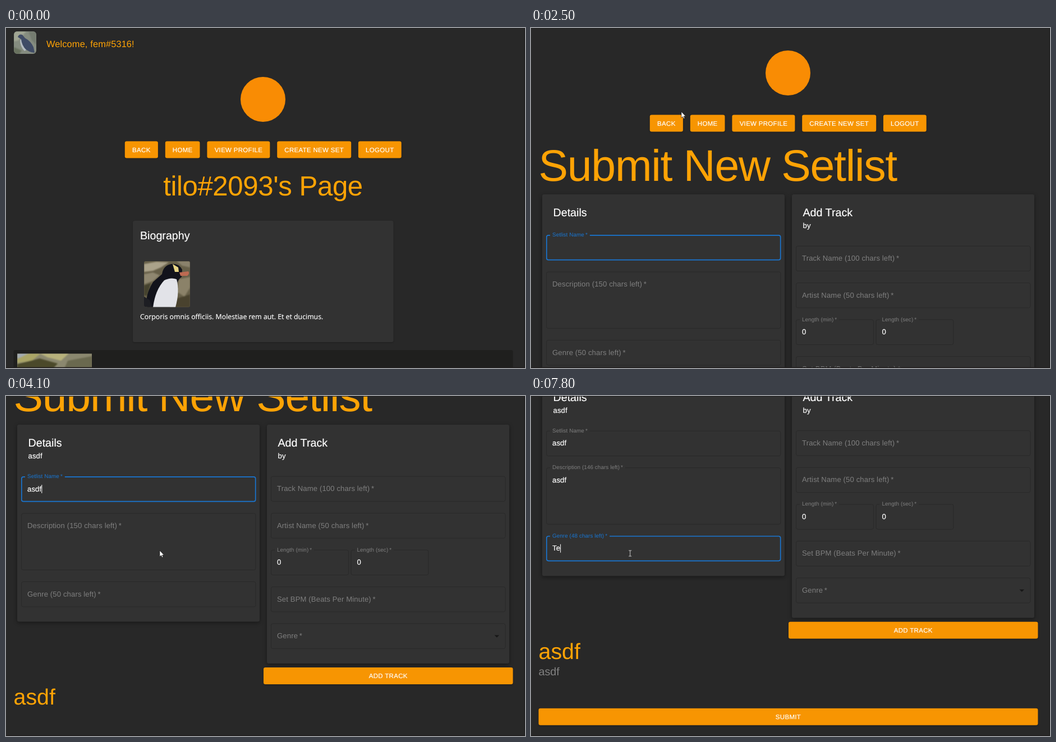
Write an HTML page that moves like this. It is 925 by 605 pixels and loops after 8 s.

```html
<!DOCTYPE html>
<html lang="en">
<head>
<meta charset="utf-8">
<title>Setlist form</title>
<style>
  html, body { margin: 0; width: 100%; height: 100%; overflow: hidden; background: #282828; }
  svg { display: block; width: 925px; height: 605px; }
  text { font-family: "Liberation Sans", Arial, sans-serif; white-space: pre; text-rendering: geometricPrecision; }
  text[fill="#fff"] { stroke: #fff; stroke-width: .2px; }
  .card { fill: #323232; filter: drop-shadow(0 2.5px 3.5px rgba(0, 0, 0, .42)); }
  .soft { fill: #323232; filter: drop-shadow(0 1px 1px rgba(0, 0, 0, .25)); }
  .btn { fill: #f79502; filter: drop-shadow(0 1px 1.5px rgba(0, 0, 0, .25)); }
  .hot { fill: #c46402; filter: drop-shadow(0 2px 2.5px rgba(0, 0, 0, .4)); }
</style>
</head>
<body>
<svg id="stage" viewBox="0 0 925 605">
  <defs>
    <clipPath id="avatarClip"><rect x="14" y="6" width="40" height="40" rx="6"/></clipPath>
    <clipPath id="bioClip"><rect x="246" y="415" width="82" height="81.5" rx="3"/></clipPath>
    <clipPath id="stripClip"><rect x="20" y="579.5" width="133" height="26"/></clipPath>
    <filter id="blur"><feGaussianBlur stdDeviation="1.2"/></filter>
  </defs>
  <rect width="925" height="605" fill="#282828"/>
  <g id="page">
    <g id="header">
      <g clip-path="url(#avatarClip)">
        <rect x="14" y="6" width="40" height="40" fill="#858c80"/>
        <g filter="url(#blur)">
          <path d="M14 6H36L22 22L14 24Z" fill="#a0a593"/>
          <path d="M40 6H54V30L46 22Z" fill="#747c70"/>
          <path d="M14 34L28 40L24 46H14Z" fill="#69725f"/>
        </g>
        <path d="M21 16Q23 10 29 12L34 18Q44 23 49 34L51 44Q40 43 33 36Q26 29 27 20Z" fill="#3f4b66"/>
        <path d="M27 20Q28 31 36 39L33 41Q25 33 25 22Z" fill="#b3bac0"/>
      </g>
      <circle cx="458" cy="127" r="40" fill="#f98c04"/>
    </g>
    <g id="profile">
      <rect class="soft" x="226" y="343" width="464.5" height="216" rx="3.3"/>
      <g clip-path="url(#bioClip)">
        <rect x="246" y="415" width="82" height="82" fill="#676049"/>
        <g filter="url(#blur)">
          <path d="M246 420L268 416L290 417L276 426L262 432L246 434Z" fill="#aaa28a"/>
          <path d="M246 438L262 435L274 440L262 450L246 456Z" fill="#8f8770"/>
          <path d="M308 447L328 443V462L318 478L306 470Z" fill="#8b8269"/>
          <path d="M302 482L328 474V497H300Z" fill="#49432f"/>
          <path d="M246 458L258 454L252 476H246Z" fill="#45432f"/>
          <path d="M304 415H328V426L314 423Z" fill="#8a826c"/>
        </g>
        <path d="M278 438Q280 423 294 420Q308 418 314 430L313 443Q305 448 303 462L292 497H252Q246 478 262 452Z" fill="#12131b"/>
        <path d="M282 449Q294 443 304 447Q310 468 302 497H262Q266 466 282 449Z" fill="#e2e3e8"/>
        <path d="M246 478L256 484L260 497H246Z" fill="#1d1e23"/>
        <path d="M297 420L307 426L308 434L301 434Z" fill="#e8d583"/>
        <path d="M309 435L325 433Q328 437 323 441L311 441Z" fill="#bd6a52"/>
      </g>
      <rect x="13.500" y="573" width="890" height="40" rx="3" fill="#1f1f1e"/>
      <g clip-path="url(#stripClip)">
        <rect x="20" y="579" width="133" height="27" fill="#8b886f"/>
        <g filter="url(#blur)">
          <path d="M20 579H42L34 585L20 588Z" fill="#a3abb0"/>
          <path d="M40 579H62L46 592L20 596V589Z" fill="#aaa566"/>
          <path d="M20 598L60 588L92 597L84 606H20Z" fill="#4b4a2a"/>
          <path d="M60 579H112L98 592L74 586Z" fill="#b8b27c"/>
          <path d="M110 592L153 584V606H104Z" fill="#6a6950"/>
        </g>
      </g>
    </g>
    <g id="setlist"></g>
  </g>
  <rect x="923.500" width="1.500" height="605" fill="#1e1e1e"/>
  <rect width="925" height="1" fill="#202020"/>
  <rect y="603.500" width="925" height="1.500" fill="#211e1e"/>
  <g id="pointer">
    <path id="arrow" d="M0 0V11L2.600 8.600L4.300 12.300L6 11.600L4.400 8H7.600Z" fill="#fff" stroke="#111" stroke-width=".6"/>
    <path id="hand" d="M-1.200 .8Q0-.6 1.200 .8V5.200Q2.400 4.400 3.300 5.600Q4.600 4.900 5.300 6.200Q6.600 5.800 6.800 7.200V10.500Q6.600 12.500 5.600 14.800H-.2Q-1.600 12-3.400 9.400Q-3.800 7.600-2.200 8L-1.200 9.200Z" fill="#fff" stroke="#111" stroke-width=".7"/>
    <path id="beam" d="M-2.500-5H2.500M0-5V5M-2.500 5H2.500" fill="none" stroke="#c4c4c4" stroke-width="1"/>
  </g>
</svg>
<script>
const LOOP = 8000, STEP = 100;
const ORANGE = '#ffa305', GREY = '#7f7f7f', BLUE = '#1976d2';
const $ = id => document.getElementById(id);

function add(parent, tag, attrs, content) {
  const node = document.createElementNS('http://www.w3.org/2000/svg', tag);
  for (const key in attrs) node.setAttribute(key, attrs[key]);
  if (content !== undefined) node.textContent = content;
  parent.appendChild(node);
  return node;
}

// em is the letter spacing in ems
function write(parent, x, y, size, content, fill = '#fff', em = 0, anchor = 'start') {
  return add(parent, 'text', {
    x, y, fill, 'font-size': size, 'letter-spacing': size * em, 'text-anchor': anchor
  }, content);
}

function button(parent, x, y, w, label) {
  const box = { x, y, width: w, height: 30, rx: 3.3 };
  add(parent, 'rect', { class: 'btn', ...box });
  const hot = add(parent, 'rect', { class: 'hot', opacity: 0, ...box });
  write(parent, x + w / 2, y + 19, 11.48, label, '#fff', .0286, 'middle');
  return hot;
}

function field(parent, x, y, w, h, label, value = '') {
  const frame = add(parent, 'rect', { fill: 'none', rx: 3.3 });
  const gap = add(parent, 'rect', { x: x + 7, y: y - 2, height: 5, fill: '#323232' });
  const tag = write(parent, x + 11, y, 13.12, '', GREY, .0094);
  const input = write(parent, x + 11, y + 26.6, 13.12, '', '#fff', .0094);
  const caret = add(parent, 'rect', { y: y + 15, width: 1, height: 15, fill: '#fff' });

  function set({ text = '', name = label, focus = false, hover = false, blink = false }) {
    const small = focus || text !== '';
    const size = small ? 9.84 : 13.12;
    const line = focus ? 1.64 : 1;
    frame.setAttribute('x', x + line / 2);
    frame.setAttribute('y', y + line / 2);
    frame.setAttribute('width', w - line);
    frame.setAttribute('height', h - line);
    frame.setAttribute('stroke-width', line);
    frame.setAttribute('stroke', focus ? BLUE : hover ? '#0c0c0c' : '#292929');
    tag.textContent = name + '\u2009*';
    tag.setAttribute('font-size', size);
    tag.setAttribute('letter-spacing', size * .0094);
    tag.setAttribute('y', y + (small ? 3.2 : 26.6));
    tag.setAttribute('fill', focus ? BLUE : GREY);
    input.textContent = text;
    gap.setAttribute('width', small ? tag.getComputedTextLength() + 8 : 0);
    caret.setAttribute('x', x + 11 + (text ? input.getComputedTextLength() : 0));
    caret.setAttribute('opacity', focus && blink ? 1 : 0);
  }
  set({ text: value });
  return set;
}

// Header
write($('header'), 72, 33.5, 16.4, 'Welcome, fem#5316!', ORANGE, .0075);
const nav = [
  [211.8, 59.1, 'BACK'], [283.8, 61.7, 'HOME'], [358.4, 112, 'VIEW PROFILE'],
  [483.2, 132, 'CREATE NEW SET'], [627.9, 76.8, 'LOGOUT']
].map(([x, w, label]) => button($('header'), x, 201.5, w, label));

// Profile page
write($('profile'), 458, 298, 49.2, "tilo#2093's Page", ORANGE, -.0083, 'middle');
write($('profile'), 239, 375.5, 19.68, 'Biography');
write($('profile'), 239, 517.5, 12.33, 'Corporis omnis officiis. Molestiae rem aut. Et et ducimus.')
  .style.fontFamily = '"Open Sans", "Noto Sans", sans-serif';

// Setlist page
const list = $('setlist');
write(list, 13.5, 318.5, 78.72, 'Submit New Setlist', ORANGE, -.0156);
const card = add(list, 'rect', { class: 'card', x: 20, y: 343, width: 432, height: 330, rx: 3.3 });
write(list, 39.5, 382, 19.68, 'Details');
const subtitle = write(list, 39.5, 403, 13.12, '', '#fff', .0094);
const left = add(list, 'g', {});
const nameField = field(left, 27, 415, 418.5, 45.5, 'Setlist Name');
const descField = field(left, 27, 480.5, 418.5, 101.5, 'Description (150 chars left)');
const genreField = field(left, 27, 602, 418.5, 45.5, 'Genre (50 chars left)');

add(list, 'rect', { class: 'card', x: 465, y: 343, width: 432, height: 425, rx: 3.3 });
write(list, 484.5, 382, 19.68, 'Add Track');
write(list, 484.5, 403, 13.12, 'by', '#fff', .0094);
field(list, 472, 434.5, 418.5, 45.5, 'Track Name (100 chars left)');
field(list, 472, 500, 418.5, 45.5, 'Artist Name (50 chars left)');
field(list, 472, 565.5, 139, 45.5, 'Length (min)', '0');
field(list, 614.5, 565.5, 139, 45.5, 'Length (sec)', '0');
field(list, 472, 631, 418.5, 45.5, 'Set BPM (Beats Per Minute)');
field(list, 472, 696.5, 418.5, 45.5, 'Genre');
add(list, 'path', { d: 'M870.500 717.500H879L874.750 721.800Z', fill: '#171717' });
button(list, 459, 775, 444.5, 'ADD TRACK');
const heading = write(list, 13.5, 841, 39.36, '', ORANGE);
const summary = write(list, 13.5, 870, 19.68, '', '#818181');
button(list, 13.5, 929, 890, 'SUBMIT');

// Timeline: ramps blend between keys, steps hold the last key
function ramp(keys, t) {
  let i = keys.findIndex(k => k[0] > t);
  if (i === 0) return keys[0].slice(1);
  if (i < 0) return keys[keys.length - 1].slice(1);
  const a = keys[i - 1], b = keys[i], f = (t - a[0]) / (b[0] - a[0]);
  return a.slice(1).map((v, n) => v + (b[n + 1] - v) * f);
}
const step = (keys, t) => keys.reduce((v, k) => k[0] <= t ? k[1] : v, keys[0][1]);

const scrollKeys = [[2300, 0], [2400, 14], [2600, 80], [2800, 111], [3000, 138], [3200, 155],
  [4000, 155], [4100, 292], [4200, 342], [4300, 365], [4400, 373.3]];
const pointerKeys = [[200, 881, 51], [400, 745, 130], [600, 570, 219], [700, 549.5, 227],
  [1100, 549.5, 227], [1200, 520, 238], [1300, 450, 242], [1500, 300, 235], [1600, 268, 222],
  [1700, 268, 222], [1900, 268, 178], [2100, 268, 149], [2600, 268, 149], [2700, 269, 149],
  [2800, 269, 149], [3200, 275.5, 262], [3300, 275.5, 274.5], [4000, 275.5, 274.5],
  [4100, 274, 275], [4500, 225, 190], [4900, 225, 190], [5100, 186.5, 264],
  [5300, 176, 279.5], [5800, 176, 279.5], [5900, 176.7, 280]];
const shapeKeys = [[0, ''], [200, 'arrow'], [600, 'hand'], [1200, 'arrow'], [2700, 'beam'],
  [2900, 'arrow'], [3200, 'beam'], [4100, 'arrow'], [4400, 'beam']];
const hoverKeys = [[400, 0], [700, 1], [1100, 1], [1300, 0]];
const caretKeys = [[0, true], [1500, false], [2100, true], [2500, false], [3000, true], [3500, false],
  [3700, true], [4300, false], [4500, true], [6100, false], [6600, true]];
const focusKeys = [[0, 'name'], [4500, 'desc'], [5200, 'genre']];
const nameKeys = [[0, ''], [3700, 'asd'], [3800, 'asdf']];
const descKeys = [[0, ''], [4600, 'a'], [4700, 'as'], [4800, 'asd'], [4900, 'asdf']];
const genreKeys = [[0, ''], [5300, 'a'], [5400, 'as'], [5500, 'asd'], [5600, 'asdf'], [6600, 'asd'],
  [6800, 'as'], [6900, 'a'], [7100, ''], [7600, 'T'], [7800, 'Te']];

const show = (node, on) => node.setAttribute('visibility', on ? 'visible' : 'hidden');
const move = (node, x, y) => node.setAttribute('transform', `translate(${x} ${y})`);

function render(t) {
  const form = t >= 1100;
  $('profile').style.display = form ? 'none' : '';
  $('setlist').style.display = form ? '' : 'none';
  move($('page'), 0, -ramp(scrollKeys, t)[0]);
  nav[3].setAttribute('opacity', ramp(hoverKeys, t)[0]);

  const shape = step(shapeKeys, t);
  move($('pointer'), ...ramp(pointerKeys, t));
  for (const id of ['arrow', 'hand', 'beam']) show($(id), id === shape);
  if (!form) return;

  const name = step(nameKeys, t), desc = step(descKeys, t), genre = step(genreKeys, t);
  const focus = step(focusKeys, t), blink = step(caretKeys, t);
  const drop = name ? 20 : 0;
  move(left, 0, drop);
  card.setAttribute('height', 330.5 + drop);
  subtitle.textContent = heading.textContent = name;
  summary.textContent = desc;

  nameField({ text: name, focus: focus === 'name', blink });
  descField({
    text: desc, focus: focus === 'desc', blink, hover: t >= 4400 && t < 5000,
    name: `Description (${150 - desc.length} chars left)`
  });
  genreField({
    text: genre, focus: focus === 'genre', blink, hover: t >= 5000,
    name: `Genre (${50 - genre.length} chars left)`
  });
}

let last = -1;
function tick() {
  const t = Math.floor(performance.now() % LOOP / STEP) * STEP;
  if (t !== last) render(last = t);
  requestAnimationFrame(tick);
}
tick();
</script>
</body>
</html>
```
